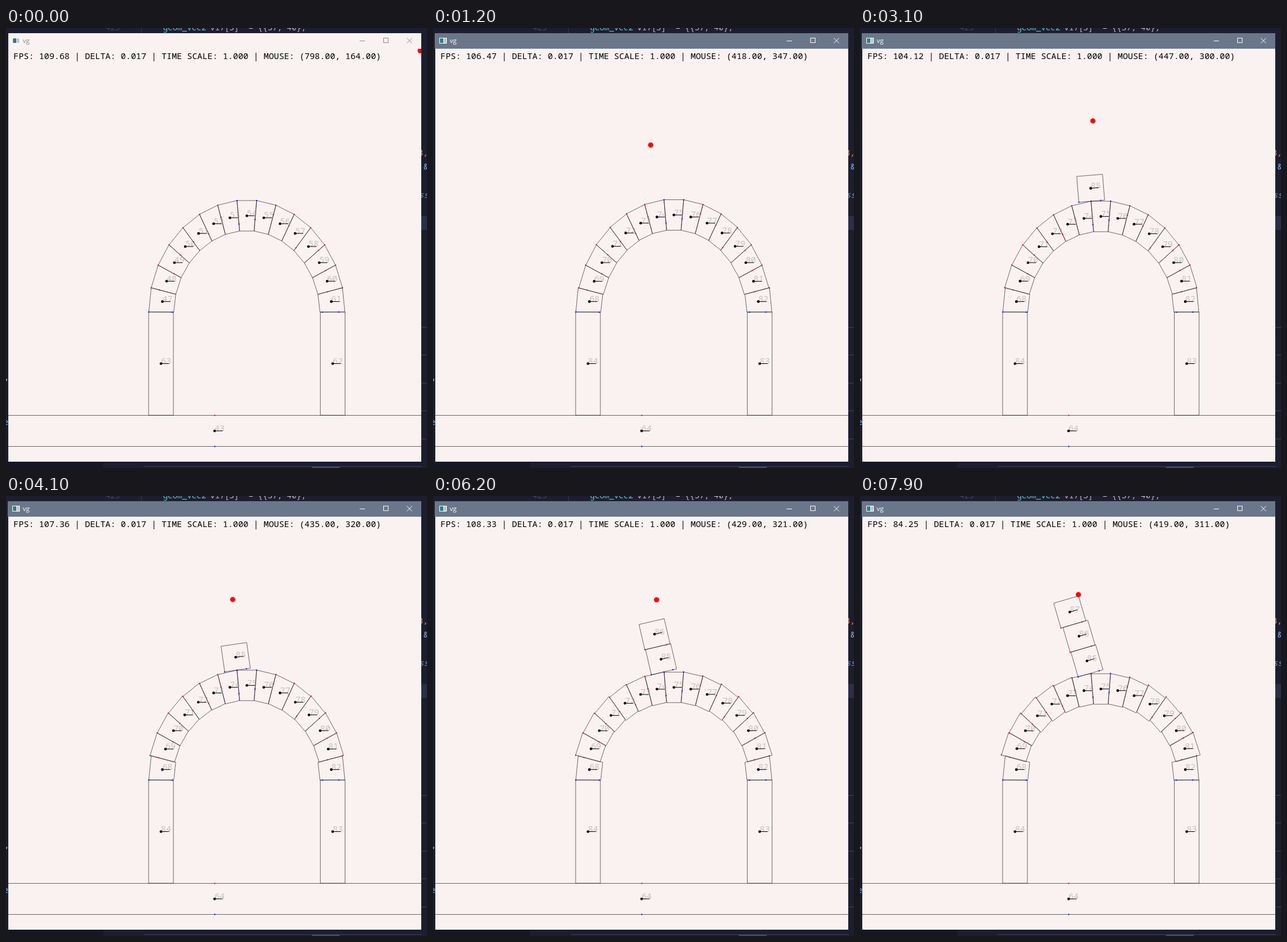
These frames come from a looping animation (732 by 765 pixels, 8000 ms). An HTML page with a canvas:

```html
<!DOCTYPE html>
<html lang="en">
<head>
<meta charset="utf-8">
<title>Arch physics</title>
<style>
  html, body { margin: 0; width: 100%; height: 100%; overflow: hidden; background: #1c1e2f; }
  canvas { display: block; }
</style>
</head>
<body>
<canvas id="stage" width="732" height="765"></canvas>
<script>
const ctx = document.getElementById('stage').getContext('2d');
const LOOP = 8000, STEP = 100, FOCUS = 300, RESET = 800;
const MONO = '14.8px "Noto Sans Mono", "DejaVu Sans Mono", monospace';
const CODE = MONO.replace('14.8', '13.9');
const RED = '#f00020', BLUE = '#1010e0', EDGE = 'rgba(0,0,0,.58)', PAPER = '#faf2f1';
const AXIS = 418.75, STONES = 15, BOX = 45, GRAVITY = 600;

// Pointer stops: arrival time, then position in world units
const STOPS = [[0, 798, 164], [600, 408, 350], [1600, 445, 337], [2600, 447, 300],
  [4200, 434, 322], [6000, 429, 321], [6800, 419, 311]];
const TRAVEL = 600;
const SPAWNS = [1810, 4320, 6840];
const FPS = '109.68 97.60 106.47 105.23 104.12 107.36 108.85 108.33 105.91 84.25'.split(' ');

const clamp = (v, lo = 0, hi = 1) => Math.min(hi, Math.max(lo, v));
const lerp = (a, b, k) => a + (b - a) * k;
const noise = n => Math.abs(Math.sin(n * 12.9898) * 43758.5453) % 1;

function rect(color, x, y, w, h) {
  ctx.fillStyle = color;
  ctx.fillRect(x, y, w, h);
}

function line(color, ...p) {
  ctx.strokeStyle = color;
  ctx.beginPath();
  for (let i = 0; i < p.length; i += 2) ctx.lineTo(p[i], p[i + 1]);
  ctx.stroke();
}

function disc(color, x, y, r) {
  ctx.fillStyle = color;
  ctx.beginPath();
  ctx.arc(x, y, r, 0, 7);
  ctx.fill();
}

function text(str, x, y, color, font) {
  ctx.font = font;
  ctx.fillStyle = color;
  ctx.fillText(str, x, y);
}

const dot = (color, [x, y]) => rect(color, x - 1, y - 1, 2, 2);

function place([x, y], pose) {
  const c = Math.cos(pose.a), s = Math.sin(pose.a);
  return [pose.x + x * c - y * s, pose.y + x * s + y * c];
}

// Outline, id and heading of a rigid body; points are local to its centre
function body(id, points, pose) {
  const path = points.map(p => place(p, pose));
  line(EDGE, ...path.flat(), ...path[0]);
  text(id, pose.x, pose.y + .5, '#c6c0c0', MONO);
  line('#000', pose.x, pose.y, ...place([14, 0], pose));
  disc('#000', pose.x, pose.y, 2.3);
}

const slab = (w, h) => [[-w / 2, -h / 2], [w / 2, -h / 2], [w / 2, h / 2], [-w / 2, h / 2]];

// Edges of joint j, counted from the left springer to the right one
function outer(j) {
  const u = j - STONES / 2;
  return [AXIS + 34.2 * u - .204 * u ** 3, 299 + 4.07 * u ** 2 - .0108 * u ** 4];
}
function inner(j) {
  const u = j - STONES / 2;
  return [AXIS + 25.2 * u - .1465 * u ** 3, 352.3 + 2.92 * u ** 2 - .0071 * u ** 4];
}
const jointPoint = (j, k) => outer(j).map((v, n) => lerp(v, inner(j)[n], k));

// How far the arch has sagged: the crown sinks while the haunches spread
const sag = t => t < RESET ? t / 12000 : Math.max(-.16, (t - 2400) / 5500);

function stone(i, p) {
  const quad = [outer(i), outer(i + 1), inner(i + 1), inner(i)];
  const [x, y] = [0, 1].map(n => quad.reduce((sum, v) => sum + v[n], 0) / 4);
  const s = i - (STONES - 1) / 2, v = Math.abs(s);
  const loose = v < 7 ? p : 0;
  const spread = 3.3 * (1 - Math.cos(Math.max(0, v - 1.5) * Math.PI / 5));
  const pose = {
    x: x + Math.sign(s) * spread * loose,
    y: y + (3.9 + 5.1 * Math.cos(.48 * v)) * loose,
    a: -.025 * Math.sin(s * Math.PI / 7) * loose
  };
  const local = q => [q[0] - x, q[1] - y];
  return { pose, local, points: quad.map(local) };
}

function arch(t, firstId) {
  for (let i = 0; i < STONES; i++) {
    const { pose, local, points } = stone(i, sag(t));
    body(firstId + i, points, pose);
    const crown = Math.abs(i - 7.5) < 1;
    for (const k of [0, .3 + .7 * noise(i + 1)]) {
      dot(crown || !i ? BLUE : RED, place(local(jointPoint(i, k)), pose));
    }
  }
  for (const k of [.27, 1]) dot(BLUE, jointPoint(STONES, k * .9));
}

function pointer(t) {
  const i = STOPS.findLastIndex(([end]) => t >= end - TRAVEL);
  const [end, ...to] = STOPS[i], from = STOPS[Math.max(0, i - 1)].slice(1);
  const k = clamp((t - end) / TRAVEL + 1);
  return from.map((v, n) => lerp(v, to[n], k * k * (3 - 2 * k)));
}

const toScreen = ([x, y]) => [3.5 + x * .898, y * .898 - 107.8];

// Resting place of box n in the tower, which leans as the arch sags
function rest(n, t) {
  const p = sag(t), lean = -.285 * Math.max(0, p) ** .6;
  const foot = { x: 403.2 - 2.3 * p, y: 300 + 8.3 * p, a: lean };
  const [x, y] = place([-1.2 * n * n, -BOX * (n + .5)], foot);
  return { x, y, a: lean };
}

function boxes(t, firstId) {
  SPAWNS.forEach((spawn, n) => {
    if (t < spawn) return;
    const [x, y] = toScreen(pointer(spawn));
    const end = rest(n, t), age = (t - spawn) / 1000;
    const fall = Math.sqrt(2 * (end.y - y) / GRAVITY);
    const settle = clamp((age - fall) / .3);
    const pose = {
      x: lerp(x, end.x, settle),
      y: Math.min(end.y, y + GRAVITY * age * age / 2),
      a: end.a * settle
    };
    body(firstId + n, slab(BOX, BOX), pose);
    if (settle < 1) return;
    for (const side of [-.5, .35]) dot(n ? RED : BLUE, place([BOX * side, BOX / 2], pose));
  });
}

function backdrop() {
  rect('#1c1e2f', 0, 0, 732, 765);
  rect('#161724', 0, 755, 169, 10);
  rect('#343950', 235, 0, 1, 9);
  text('425', 173, 4, '#434760', CODE);
  text('geom_vec2', 273, 4, '#5fc7c9', CODE);
  text('v17[3]  = {{37, 40},', 355, 4, '#c9b5c0', CODE);
  text('3,', 717, 222, '#ef8f6a', CODE);
  text('&', 726, 246, '#86b4ee', CODE);
  text('ss', 718, 295, '#7197d8', 'italic ' + CODE);
  text(',', -3, 612, '#b5c0e8', CODE);
  text('e', -4, 690, '#86b4ee', CODE);
  rect('#2a2f49', 722, 327, 10, 24);
  for (let i = 0; i < 5; i++) rect('#3b4260', 722, 520 + i * 48.5 | 0, 10, 1);
  rect('#3b4260', 240, 762, 483, 1);
  rect('#434a6b', 532, 763, 48, 2);
}

function titleBar(focused) {
  const ink = focused ? '#fff' : '#8c8889';
  if (focused) rect('#6a778b', 3, 9, 719, 27);
  rect('#fff', 11, 17, 13, 10);
  rect('#2f7f86', 12, 18, 6, 8);
  rect('#b9c3c9', 19, 18, 4, 8);
  text('vg', 29, 26, ink, '11.5px "Open Sans", sans-serif');
  line(ink, 615, 22.5, 624, 22.5);
  ctx.strokeStyle = ink;
  ctx.strokeRect(656.5, 17.5, 8, 8);
  line(ink, 697, 17.5, 706, 26.5);
  line(ink, 706, 17.5, 697, 26.5);
}

function hud(t) {
  const fps = FPS[t < FOCUS ? 0 : 1 + Math.floor((t + 250) / 950)];
  const mouse = pointer(t).map(v => Math.round(v).toFixed(2)).join(', ');
  text(`FPS: ${fps} | DELTA: 0.017 | TIME SCALE: 1.000 | MOUSE: (${mouse})`, 13, 54, '#000', MONO);
}

function draw(t) {
  const base = t < RESET ? 43 : 64;
  backdrop();
  rect(PAPER, 4, 9, 718, 745);
  titleBar(t >= FOCUS);

  ctx.save();
  ctx.beginPath();
  ctx.rect(4, 36, 718, 718);
  ctx.clip();
  body(base, slab(900, 54), { x: 362.7, y: 700.5, a: 0 });
  dot(RED, [363, 673.5]);
  dot(BLUE, [363, 727.5]);
  body(base + 20, slab(43, 179.5), { x: 269.5, y: 583.5, a: 0 });
  body(base + 19, slab(43, 179.5), { x: 568, y: 583.5, a: 0 });
  arch(t, base + 4);
  boxes(t, base + 21);
  hud(t);
  disc('#f00', ...toScreen(pointer(t)), 4.5);
  ctx.restore();
}

const start = performance.now();
function tick() {
  const t = (performance.now() - start) % LOOP;
  draw(Math.floor(t / STEP) * STEP);
  requestAnimationFrame(tick);
}
tick();
</script>
</body>
</html>
```
